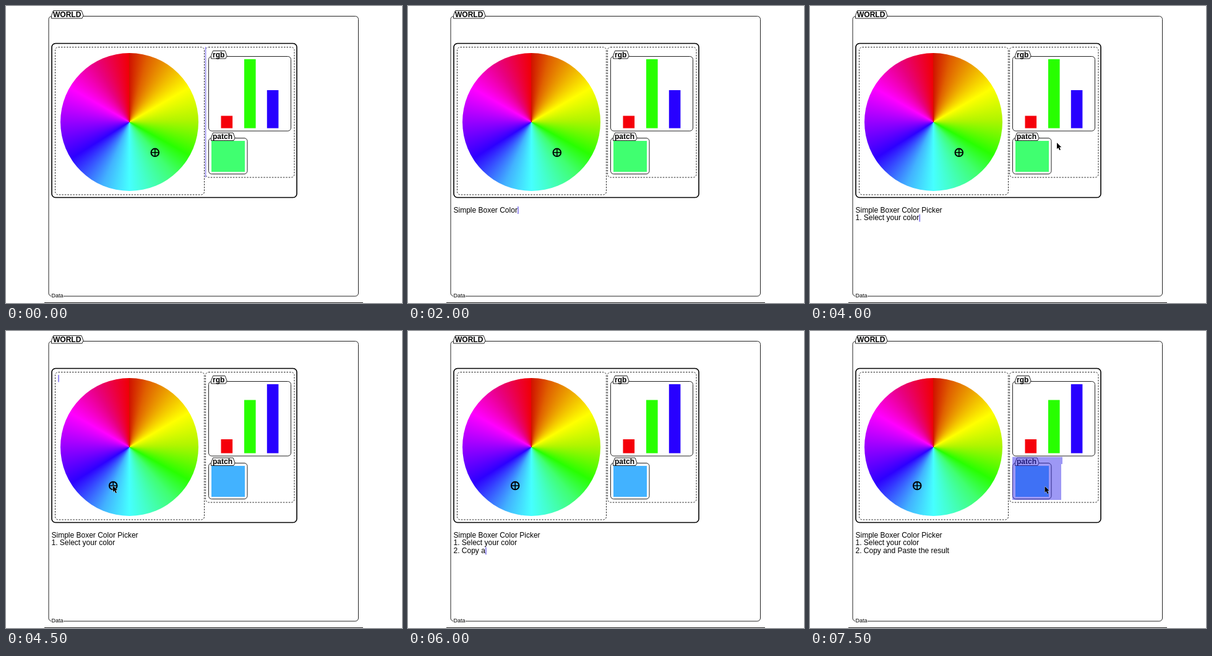
Write an HTML page that moves like this. It is 640 px wide and 480 px high and loops after 8 s.

```html
<!DOCTYPE html>
<html lang="en">
<head>
<meta charset="utf-8">
<title>Color picker</title>
<style>
  html, body { margin: 0; width: 100%; height: 100%; overflow: hidden; background: #fff; }
  #stage { position: relative; width: 640px; height: 480px; overflow: hidden; }
  #wheel {
    position: absolute; left: 88px; top: 75.5px; width: 223px; height: 223px; border-radius: 50%;
    background: conic-gradient(
      #d01400 0deg, #e06000 16deg, #eca000 34deg, #ffff00 60deg, #b0f500 88deg,
      #28ff00 119deg, #40ff70 140deg, #46ffff 180deg, #42b2ff 203deg,
      #2d00ff 238deg, #9000ff 268deg, #ff00ff 300deg, #e80080 330deg, #f00008 359deg, #e60000 360deg);
  }
  svg { position: absolute; left: 0; top: 0; }
  text { font-family: "Liberation Sans", Arial, sans-serif; font-size: 12px; fill: #000; white-space: pre; }
  .label { font-weight: bold; }
  .box { fill: none; stroke: #222; }
  .dash { stroke-dasharray: 2.5 2; }
  .tag { fill: #fff; stroke: #222; }
</style>
</head>
<body>
<div id="stage">
  <div id="wheel"></div>
  <svg width="640" height="480" viewBox="0 0 640 480">
    <rect class="box" x="69" y="16.5" width="500.5" height="452.5" rx="5"/>
    <path class="box" d="M62 479.5H577"/>
    <rect x="73" y="464" width="20" height="9" fill="#fff"/>
    <text x="73.5" y="471" style="font-size:9px">Data</text>
    <rect class="box" x="74" y="60.5" width="396" height="249" rx="6" stroke-width="1.6" style="stroke:#000"/>
    <rect class="box dash" x="79.5" y="66.5" width="241" height="238.5" rx="5"/>
    <rect class="box dash" x="322.5" y="66.5" width="143.5" height="210.5" rx="5"/>
    <rect class="box" x="327.5" y="81.5" width="133" height="120.5" rx="5"/>
    <rect class="box" x="327.5" y="213.5" width="62.5" height="58" rx="5"/>
    <g id="tags"></g>
    <g id="bars"></g>
    <rect id="patch" x="332" y="218" width="54" height="50"/>
    <g id="marker" fill="none" stroke="#000">
      <circle r="6.3" stroke-width="2"/>
      <path d="M-6 0H6M0-6V6" stroke-width="1.6"/>
    </g>
    <g id="lines"></g>
    <rect id="caret" fill="#978df0"/>
    <path id="selection" d="M327 203.5H408V215H406V273H327Z" fill="#3c32eb" fill-opacity=".5"/>
    <path id="pointer" d="M0 0V10L2.3 8L4.2 12L6 11.2L4.2 7.3H7.3Z" fill="#000" stroke="#fff" stroke-width=".8" paint-order="stroke"/>
  </svg>
</div>
<script>
const STEP = 500, LOOP = 8000, LEFT = 73.5;
const LINES = ["Simple Boxer Color Picker", "1. Select your color", "2. Copy and Paste the result"];
const $ = id => document.getElementById(id);

function add(parent, name, attrs, text = "") {
  const el = document.createElementNS("http://www.w3.org/2000/svg", name);
  set(el, attrs);
  el.textContent = text;
  return parent.appendChild(el);
}
function set(el, attrs) {
  for (const key in attrs) el.setAttribute(key, attrs[key]);
}
function place(el, pos) {
  set(el, pos ? { transform: `translate(${pos})`, visibility: "visible" } : { visibility: "hidden" });
}

// Name tags sit on the top edge of their boxes: x, y, width, label.
[[73.5, 7.5, 51.5, "WORLD"], [331.5, 72.5, 25.5, "rgb"], [331.5, 205, 38.5, "patch"]].forEach(([x, y, w, label]) => {
  add($("tags"), "path", { class: "tag", d: `M${x} ${y + 12.5}V${y + 8}L${x + 3} ${y}H${x + w - 3}L${x + w} ${y + 8}L${x + w - 2} ${y + 12.5}Z` });
  add($("tags"), "text", { class: "label", x: x + 2.5, y: y + 10.3 }, label);
});

const bars = [["#f5000a", 347.5], ["#28ff00", 385], ["#2800ff", 421.8]]
  .map(([fill, x]) => add($("bars"), "rect", { fill, x, width: 18.6 }));
const rows = LINES.map((_, i) => add($("lines"), "text", { x: LEFT, y: 333.7 + 12.7 * i }));

const GREEN = { patch: "#40ff70", heights: [20, 111.5, 61.5], marker: [240.8, 236.8] };
const BLUE = { patch: "#42b2ff", heights: [22.5, 86, 111.5], marker: [173.2, 250] };

// Typed characters per line; the caret follows the last line unless given.
const steps = [
  { typed: [], caret: [321.8, 66, 1.6, 211] },
  { typed: [0] },
  { typed: [4] },
  { typed: [11] },
  { typed: [18] },
  { typed: [25, 0] },
  { typed: [25, 7] },
  { typed: [25, 15] },
  { typed: [25, 20], pointer: [399, 221] },
  { typed: [25, 20], color: BLUE, caret: [84, 71, 2, 11.5], pointer: [173, 250] },
  { typed: [25, 20], color: BLUE, caret: [84, 71, 2, 11.5], pointer: [174.5, 268] },
  { typed: [25, 20, 0], color: BLUE },
  { typed: [25, 20, 9], color: BLUE },
  { typed: [25, 20, 18], color: BLUE },
  { typed: [25, 20, 28], color: BLUE },
  { typed: [25, 20, 28], color: BLUE, selected: true, pointer: [379.5, 251] }
];

function show({ typed, caret, pointer, selected, color = GREEN }) {
  rows.forEach((row, i) => row.textContent = LINES[i].slice(0, typed[i] || 0));
  bars.forEach((bar, i) => set(bar, { y: 197.5 - color.heights[i], height: color.heights[i] }));
  set($("patch"), { fill: color.patch });
  place($("marker"), color.marker);
  place($("pointer"), pointer);
  place($("selection"), selected && [0, 0]);

  const last = typed.length - 1;
  const [x, y, width, height] = caret ||
    [LEFT + rows[last].getComputedTextLength(), 324 + 12.7 * last, 2, 12];
  set($("caret"), { x, y, width, height, visibility: selected ? "hidden" : "visible" });
}

let shown = -1;
const start = performance.now();
function tick() {
  const now = Math.floor((performance.now() - start) % LOOP / STEP);
  if (now !== shown) show(steps[shown = now]);
  requestAnimationFrame(tick);
}
tick();
</script>
</body>
</html>
```
